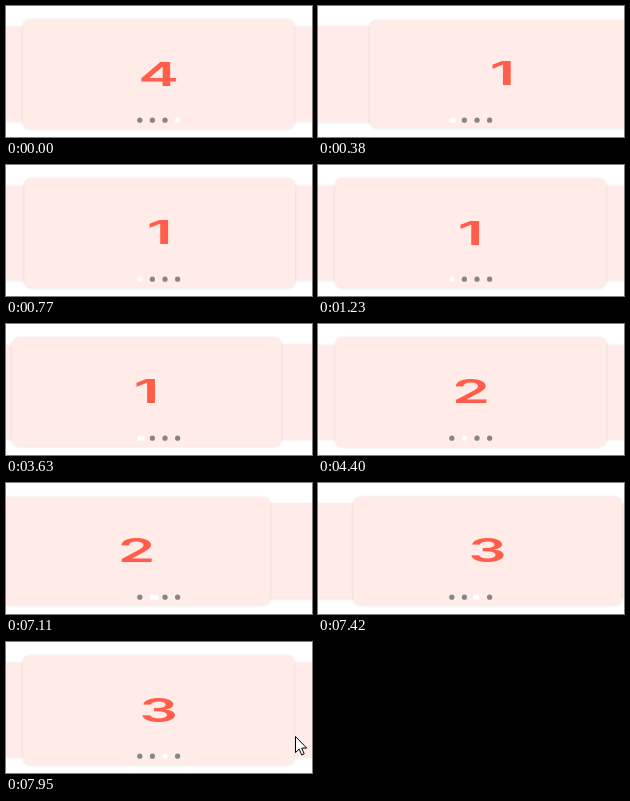
An HTML page with a canvas for the animation above (8000 ms loop, 306 by 131 pixels).

```html
<!DOCTYPE html>
<html lang="en">
<head>
<meta charset="utf-8">
<title>Card carousel</title>
<style>
html, body { margin: 0; width: 100%; height: 100%; overflow: hidden; background: #fff; }
canvas { display: block; width: 306px; height: 131px; }
</style>
</head>
<body>
<canvas id="stage"></canvas>
<script>
const W = 306, H = 131, LOOP = 8000;
const CARD = { w: 271, h: 110, r: 7, cx: 152.6, cy: 67.9 };
const DOT = { x: 133.8, y: 114.2, gap: 12.6, r: 2.6 };
const STARTS = [134, 3618, 7089.5];
const SLIDE_MS = 800;
const TICK = 77.25, PHASE = 147;
const COUNT = 4;

const canvas = document.getElementById('stage');
const ctx = canvas.getContext('2d');
const dpr = window.devicePixelRatio || 1;
canvas.width = W * dpr;
canvas.height = H * dpr;

const clamp = v => Math.max(0, Math.min(1, v));
const easeOutExpo = x => x >= 1 ? 1 : 1 - 2 ** (-10 * x);

// Page position; starts on the last card and keeps counting up
function pageAt(t) {
  return STARTS.reduce((p, s) => p + easeOutExpo(clamp((t - s) / SLIDE_MS)), COUNT - 1);
}

function pill(x, y, w, h, r) {
  ctx.beginPath();
  ctx.roundRect(x, y, w, h, r);
  ctx.fill();
}

// Cards recede in depth the further they are from the centre
function drawCard(i, offset) {
  const s = 1200 / (1200 + 200 * Math.abs(offset));
  ctx.save();
  ctx.translate(CARD.cx + CARD.w * offset * s, CARD.cy);
  ctx.scale(s, s);
  ctx.shadowColor = 'rgba(60, 30, 30, 0.12)';
  ctx.shadowBlur = 3 * dpr;
  ctx.shadowOffsetY = 0.5 * dpr;
  ctx.fillStyle = '#ffebe8';
  pill(-CARD.w / 2, -CARD.h / 2, CARD.w, CARD.h, CARD.r);
  ctx.shadowColor = 'transparent';
  ctx.scale(1.85, 1);
  ctx.font = '600 33px Inter, Roboto, sans-serif';
  ctx.textAlign = 'center';
  ctx.fillStyle = '#ff5f4a';
  ctx.fillText(String(i % COUNT + 1), 0, 11.6);
  ctx.restore();
}

function drawCards(page) {
  const mid = Math.round(page);
  [-2, -1, 0, 1, 2]
    .map(d => mid + d)
    .sort((a, b) => Math.abs(b - page) - Math.abs(a - page))
    .forEach(i => drawCard(i, i - page));
}

// The white marker stretches towards the next dot, then pulls its tail in
function drawDots(page) {
  const f = page % 1;
  let from = Math.floor(page) % COUNT;
  let tail = Math.max(0, 2 * f - 1), head = Math.min(1, 4 * f);
  if (from === COUNT - 1) {
    if (f > 0.5) from = 0;
    tail = 0;
    head = f > 0.5 ? 1 - f : 0;
  }
  ctx.fillStyle = '#878585';
  for (let i = 0; i < COUNT; i++) {
    const covered = i > from + tail - 0.1 && i < from + head + 0.1;
    if (!covered) pill(DOT.x + i * DOT.gap - DOT.r, DOT.y - DOT.r, 2 * DOT.r, 2 * DOT.r, DOT.r);
  }
  ctx.fillStyle = '#fff';
  pill(DOT.x + (from + tail) * DOT.gap - DOT.r, DOT.y - DOT.r,
    (head - tail) * DOT.gap + 2 * DOT.r, 2 * DOT.r, DOT.r);
}

function drawPointer(x, y) {
  ctx.save();
  ctx.translate(x + 0.5, y + 0.5);
  ctx.beginPath();
  [[0, 0], [0, 16], [3.7, 12.6], [6.3, 18.5], [8.7, 17.4], [6.2, 11.6], [11.2, 11.6]]
    .forEach(p => ctx.lineTo(...p));
  ctx.closePath();
  ctx.fillStyle = '#fff';
  ctx.fill();
  ctx.strokeStyle = '#000';
  ctx.lineWidth = 1;
  ctx.stroke();
  ctx.restore();
}

function pointerAt(t) {
  if (t > 7945) return [289, 94];
  if (t < 910 || t > 1220) return null;
  const u = (t - 919) / 232;
  return [292 - 62 * u + 50 * u * u, 122 - 58 * u + 32 * u * u];
}

function draw(now) {
  const t = now % LOOP;
  const step = Math.floor((t - PHASE) / TICK) * TICK + PHASE;
  const page = pageAt(step);
  ctx.setTransform(dpr, 0, 0, dpr, 0, 0);
  ctx.fillStyle = '#fff';
  ctx.fillRect(0, 0, W, H);
  drawCards(page);
  drawDots(page);
  const pointer = pointerAt(step);
  if (pointer) drawPointer(...pointer);
}

const begin = performance.now();
function frame() {
  draw(performance.now() - begin);
  requestAnimationFrame(frame);
}
frame();
</script>
</body>
</html>
```
